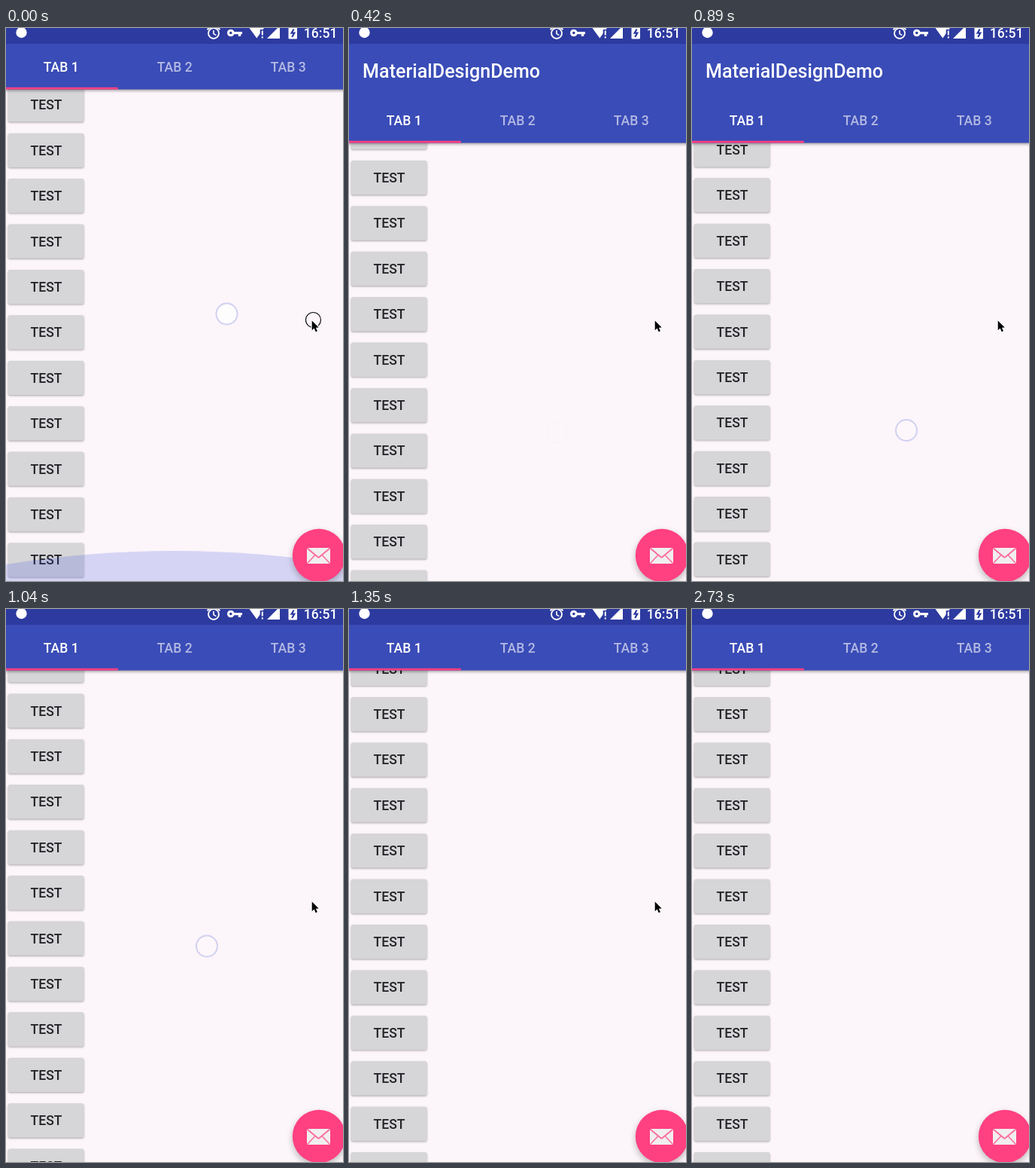
Animation of 448x734 px, one loop 3.78 s. Source, as an HTML page with a canvas:

```html
<!DOCTYPE html>
<html lang="en">
<head>
<meta charset="utf-8">
<title>Collapsing toolbar</title>
<style>
html, body { margin: 0; width: 100%; height: 100%; overflow: hidden; background: #fcf5fa; }
canvas { display: block; width: 448px; height: 734px; }
</style>
</head>
<body>
<canvas id="stage"></canvas>
<script>
const W = 448, H = 734, LOOP = 3780;
const DP = 1.2585;               // stage pixels per density-independent pixel
const PITCH = 48 * DP, BAR = 71, STATUS = 21;
const BLUE = '#3a4cb7', DARK = '#2d3a9f', PINK = '#ff4081', PAPER = '#fcf5fa';
const FONT = 'Roboto, "Noto Sans", sans-serif';

// how far each drag and each fling moves the content
const DRAG_DOWN = 157.1, FLING_DOWN = 23.3, DRAG_UP = 86.8, FLING_UP = 55.9;
const OPEN = DRAG_DOWN + FLING_DOWN;

const canvas = document.getElementById('stage');
const ratio = window.devicePixelRatio || 1;
canvas.width = W * ratio;
canvas.height = H * ratio;
const c = canvas.getContext('2d');
c.scale(ratio, ratio);

const clamp = (v, lo, hi) => Math.min(hi, Math.max(lo, v));
const smooth = u => u * u * (3 - 2 * u);
const easeIn = u => u ** 1.7;
const easeOut = u => 1 - (1 - u) ** 2.2;

// progress from 0 to 1 that only advances when the screen refreshes
function progress(t, start, end, step) {
  const span = clamp(t, start, end) - start;
  return Math.floor(span / step) * step / (end - start);
}

function poly(points, fill) {
  c.beginPath();
  points.forEach(([x, y]) => c.lineTo(x, y));
  c.closePath();
  c.fillStyle = fill;
  c.fill();
}

function disc(x, y, r, fill) {
  c.beginPath();
  c.arc(x, y, r, 0, Math.PI * 2);
  c.fillStyle = fill;
  c.fill();
}

function ring(x, y, r, color, width) {
  c.beginPath();
  c.arc(x, y, r, 0, Math.PI * 2);
  c.strokeStyle = color;
  c.lineWidth = width;
  c.stroke();
}

function line(color, width, ...points) {
  c.beginPath();
  points.forEach(([x, y]) => c.lineTo(x, y));
  c.strokeStyle = color;
  c.lineWidth = width;
  c.stroke();
}

function box(x, y, w, h, fill, r = 0) {
  c.beginPath();
  c.roundRect(x, y, w, h, r);
  c.fillStyle = fill;
  c.fill();
}

function text(s, x, y, size, color, align) {
  c.font = `500 ${size}px ${FONT}`;
  c.textAlign = align;
  c.fillStyle = color;
  c.fillText(s, x, y);
}

function shadow(color, blur, dy) {
  c.shadowColor = color;
  c.shadowBlur = blur * ratio;
  c.shadowOffsetY = dy * ratio;
}

const noShadow = () => shadow('transparent', 0, 0);

function drawList(pull) {
  const first = (102.3 + pull) % PITCH;
  for (let y = first; y < H + PITCH; y += PITCH) {
    shadow('rgba(0,0,0,.3)', 2.5, 1.2);
    box(2.8, y - 23, 100.7, 45.3, '#d6d5d8', 2.5);
    noShadow();
    text('TEST', 53.5, y + 6.05, 14 * DP, '#242327', 'center');
  }
}

function drawGlow(height) {
  if (height <= 0) return;
  const top = H - height, side = top + height * 0.45;
  c.beginPath();
  c.moveTo(0, H);
  c.lineTo(0, side);
  c.quadraticCurveTo(W / 2, 2 * top - side, W, side);
  c.lineTo(W, H);
  c.fillStyle = 'rgba(63,81,220,.2)';
  c.fill();
}

function drawFab() {
  shadow('rgba(0,0,0,.26)', 8, 4);
  disc(416, 700, 35.2, PINK);
  noShadow();
  box(400, 690, 31, 21, '#f1eef0', 2.5);
  for (const side of [-1, 1]) {
    line('#fb6a9b', 1.8, [415.5, 703], [415.5 + side * 14.5, 691]);
    line('#fb6a9b', 1.5, [415.5 + side * 5, 700], [415.5 + side * 14.5, 710]);
  }
}

function drawHeader(shift) {
  const bottom = 152.5 + shift;
  shadow('rgba(0,0,0,.4)', 4, 1.5);
  box(-8, 0, W + 16, bottom, BLUE);
  noShadow();
  text('MaterialDesignDemo', 18.1, 66.2 + shift, 25.1, '#fff', 'left');
  for (let i = 0; i < 3; i++) {
    text('TAB ' + (i + 1), 73.3 + i * 151, bottom - 23.5, 14 * DP, i ? '#b2b8e3' : '#fff', 'center');
  }
  box(0, bottom - 2.8, 148.8, 2.8, PINK);
}

function drawStatus() {
  box(0, 0, W, STATUS, DARK);
  disc(20.5, 6, 7.2, '#fff');

  // alarm
  ring(276, 7, 7, '#fff', 1.9);
  line('#fff', 1.6, [276, 3], [276, 7.6], [279.3, 9.6]);
  for (const side of [-1, 1]) line('#fff', 2, [276 + side * 8.5, 2.2], [276 + side * 4.5, -1.2]);

  // key
  ring(298.8, 6.5, 3.3, '#fff', 3);
  box(302.5, 5, 11.5, 3.2, '#fff');
  box(308.8, 6, 3.4, 5, '#fff');

  // wireless and cell signal
  poly([[323.5, 0], [333, -3], [343, 0], [333.3, 13.5]], '#fff');
  box(337.7, 2, 6, 13, DARK);
  box(339.8, 3.5, 2, 6, '#fff');
  box(339.8, 11.3, 2, 2.2, '#fff');
  poly([[347, 14], [364, 14], [364, -3]], '#fff');

  // battery
  box(375.5, -1, 11.5, 15.5, '#fff', 1);
  line(DARK, 2.2, [382.6, 1.5], [379.6, 6.6], [383.3, 6.6], [380.2, 12]);
  text('16:51', 395.8, 12.8, 14 * DP, '#fff', 'left');
}

function drawTouch(x, y, alpha, glare) {
  c.globalAlpha = alpha;
  disc(x, y, 14, `rgba(255,255,255,${glare})`);
  ring(x, y, 14, '#d1d0f0', 2);
  c.globalAlpha = 1;
}

function drawPointer(t) {
  if (t >= 2730) return;
  if (t < 60) ring(408.5, 387.5, 10, '#111', 1.2);
  const away = progress(t, 2500, 2680, 60) ** 2.8;
  c.save();
  c.translate(406.2 + 10 * away, 388 + 306 * away);
  c.lineJoin = 'round';
  const arrow = [[0.5, 0.5], [0.5, 13.2], [3.4, 10.5], [5.5, 15.3], [7.7, 14.3], [5.7, 9.7], [9.5, 9.5]];
  line('#fff', 2, ...arrow, arrow[0]);
  poly(arrow, '#000');
  c.restore();
}

function draw(t) {
  const dragDown = smooth(progress(t, 60, 420, 90));
  const flingDown = easeOut(progress(t, 420, 660, 60));
  const dragUp = easeIn(progress(t, 830, 1040, 70));
  const flingUp = easeOut(progress(t, 1075, 1350, 55));
  const down = DRAG_DOWN * dragDown + FLING_DOWN * flingDown;
  const up = DRAG_UP * dragUp + FLING_UP * flingUp;

  // the bar opens with the first pull and closes with the first push back
  const shift = t < 830 ? clamp(down - BAR, -BAR, 0) : -Math.min(up, BAR);

  box(0, 0, W, H, PAPER);
  drawList(down - up);
  drawGlow(40 - 20 * progress(t, 0, 120, 60) * 2);
  drawFab();
  drawHeader(shift);
  drawStatus();
  if (t < 480) {
    drawTouch(293.5 - 16 * dragDown, 379.5 + down, dragDown < 1 ? 1 : 0.05, 0.75);
  } else if (t >= 830 && t < 1185) {
    drawTouch(285 - 18 * dragUp, 534 - 86.5 * dragUp, t < 1130 ? 1 : 0.3, 0.25);
  }
  drawPointer(t);
}

const start = performance.now();
function tick() {
  draw((performance.now() - start) % LOOP);
  requestAnimationFrame(tick);
}
tick();
</script>
</body>
</html>
```
